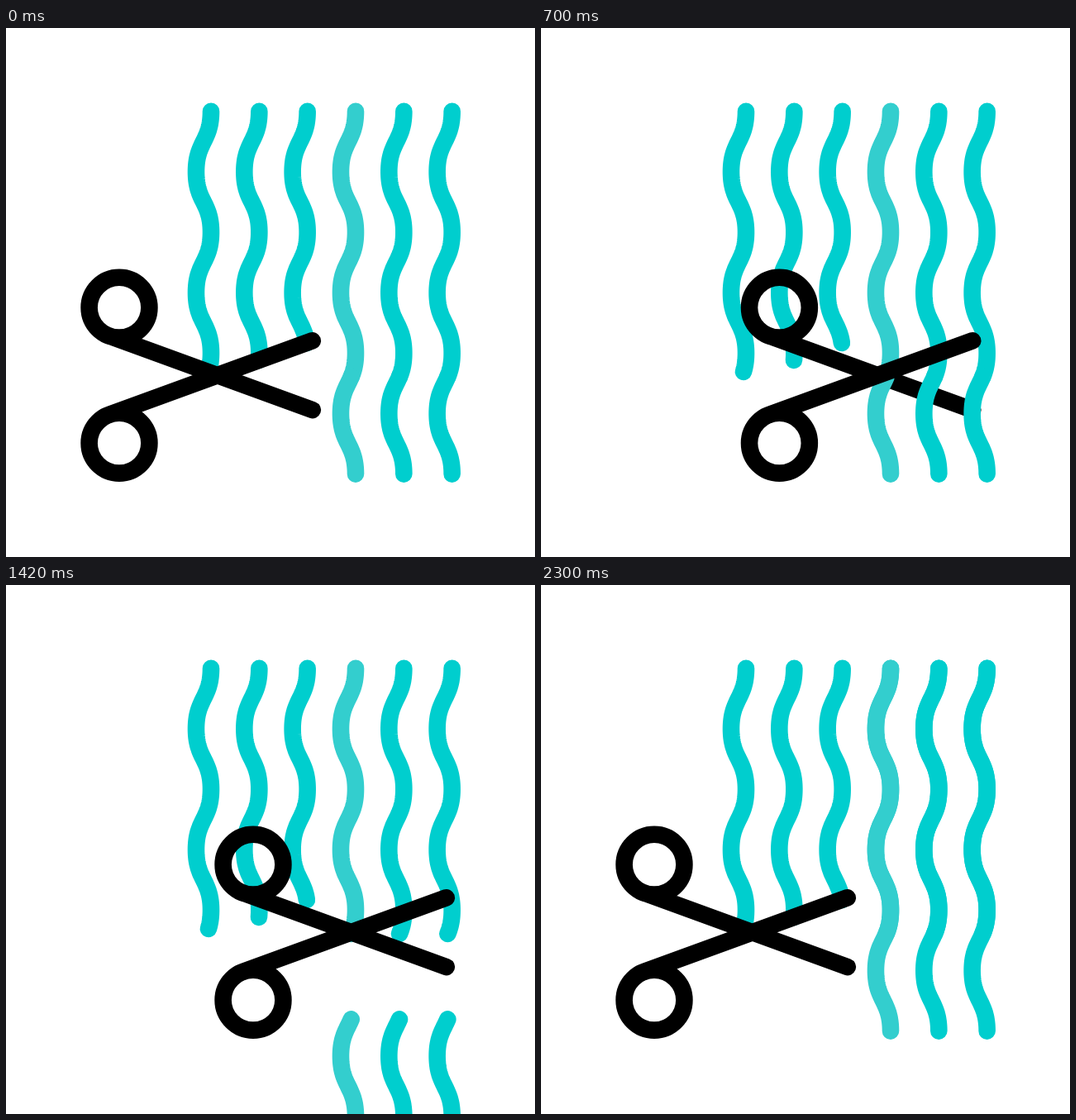
An HTML page with a canvas that plays this animation: 640 px wide and 640 px high, repeating every 2.4 s.

```html
<!DOCTYPE html>
<html lang="en">
<head>
<meta charset="utf-8">
<style>
html, body { margin: 0; width: 100%; height: 100%; overflow: hidden; background: #fff; }
canvas { display: block; }
</style>
</head>
<body>
<canvas id="stage" width="640" height="640"></canvas>
<script>
const ctx = document.getElementById('stage').getContext('2d');
const LOOP = 2400;
const TOP = 100.8, BOTTOM = 539.6, BEND = (BOTTOM - TOP) / 6;
const CUT = 422;
const TEAL = '#00cece', PALE = '#33cece';
const strands = [416, 402, 381, CUT, CUT, CUT].map((end, i) => ({
  x: 248 + i * 58.33,
  end,
  color: i === 3 ? PALE : TEAL
}));
const rightStrands = strands.slice(3);

// Eased progress between two times
function ease(t, from, to) {
  const u = Math.min(1, Math.max(0, (t - from) / (to - from)));
  return u * u * (3 - 2 * u);
}

// Sideways offset of a strand at height y: S-shaped Bezier bends, alternately left and right
function wave(y) {
  const bends = (y - TOP) / BEND, n = Math.floor(bends), v = bends - n;
  let u = v;
  for (let i = 0; i < 5; i++) {
    u -= (1.5 * u - 1.5 * u * u + u ** 3 - v) / (1.5 - 3 * u + 3 * u * u);
  }
  const s = u * u * (3 - 2 * u);
  return -18 * (n % 2 ? 1 - s : s);
}

function drawStrand({ x, color }, from, to, drop = 0) {
  ctx.strokeStyle = color;
  ctx.beginPath();
  for (let y = from; y < to; y += 2) ctx.lineTo(x + wave(y), y + drop);
  ctx.lineTo(x + wave(to), to + drop);
  ctx.stroke();
}

// One blade with its ring; the back blade mirrors the front one
function drawBlade(shift, angle, mirrored) {
  ctx.save();
  if (mirrored) ctx.transform(1, 0, 0, -1, 0, 840.4);
  ctx.translate(252 + shift, 424);
  ctx.rotate(angle * Math.PI / 180);
  ctx.translate(-252, -424);
  ctx.strokeStyle = '#000';
  ctx.beginPath();
  ctx.moveTo(370.8, 378.3);
  ctx.lineTo(124.5, 468);
  ctx.moveTo(137 + 36.4, 502.2);
  ctx.arc(137, 502.2, 36.4, 0, Math.PI * 2);
  ctx.stroke();
  ctx.restore();
}

function draw(t) {
  const shift = 163.3 * (ease(t, 200, 800) - ease(t, 1400, 1800));
  const angle = 14.06 * (ease(t, 800, 1100) - ease(t, 1100, 1400));
  const growing = t >= 1800;

  ctx.fillStyle = '#fff';
  ctx.fillRect(0, 0, 640, 640);
  ctx.lineWidth = 20.6;
  ctx.lineCap = ctx.lineJoin = 'round';

  for (const s of strands) drawStrand(s, TOP, s.end);
  drawBlade(shift, angle, true);
  for (const s of rightStrands) {
    if (growing) drawStrand(s, TOP, 408 + (BOTTOM - 408) * ease(t, 1800, 2300));
    else drawStrand(s, CUT, BOTTOM, 236 * ease(t, 1100, 1800));
  }
  drawBlade(shift, angle, false);
}

const start = performance.now();
function tick() {
  draw((performance.now() - start) % LOOP);
  requestAnimationFrame(tick);
}
tick();
</script>
</body>
</html>
```
